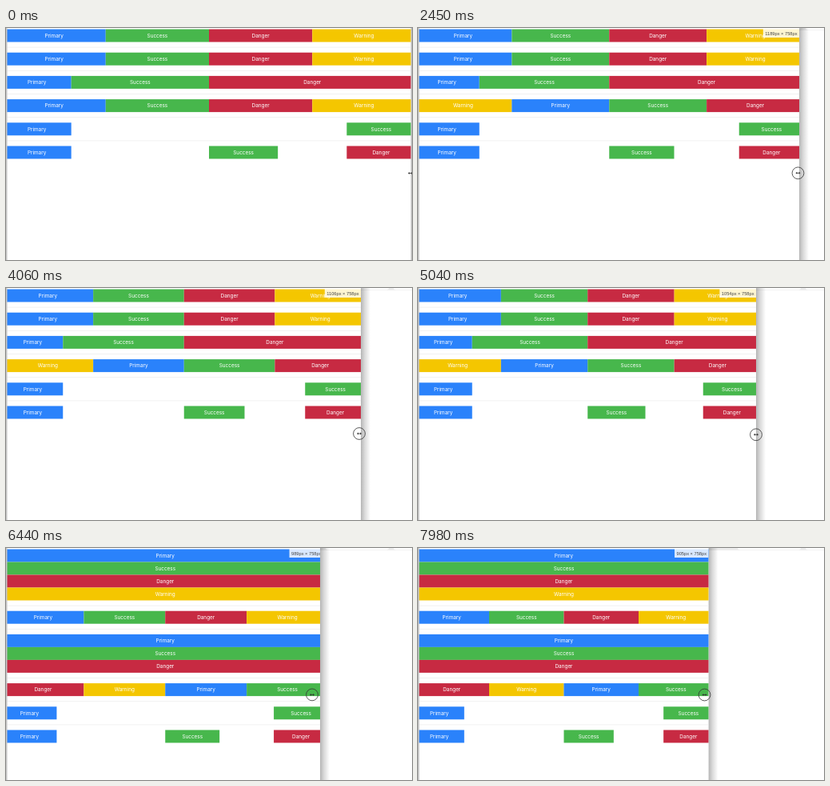
Write an HTML page with a canvas that moves like this. It is 508 by 290 pixels and loops after 8 s.

```html
<!DOCTYPE html>
<html lang="en">
<head>
<meta charset="utf-8">
<title>Responsive grid</title>
<style>
  html, body { margin: 0; width: 100%; height: 100%; overflow: hidden; background: #fff; }
  canvas { display: block; width: 508px; height: 290px; }
</style>
</head>
<body>
<canvas></canvas>
<script>
const STAGE_W = 508, STAGE_H = 290, LOOP = 8000, STEP = 70;
const SCALE = 0.4;              // stage pixels per page pixel
const LEFT = 1.5, TOP = 1.5, BAR = 16, GAP = 13.2, GUTTER = 6;

const canvas = document.querySelector('canvas');
const ctx = canvas.getContext('2d');
const dpr = window.devicePixelRatio || 1;
canvas.width = STAGE_W * dpr;
canvas.height = STAGE_H * dpr;
ctx.scale(dpr, dpr);

const COLORS = { Primary: '#2a82fb', Success: '#47b74c', Danger: '#c72a42', Warning: '#f4c600' };
const [P, S, D, W] = Object.keys(COLORS);

// [time, x] of the window's right edge and of the pointer dragging it
const edgeKeys = [[0, 506.5], [840, 506], [1540, 493.5], [1610, 493.5], [1750, 489.5],
  [2380, 477], [3430, 476.5], [3990, 444], [4060, 444], [4270, 438], [4970, 423], [5040, 423],
  [5110, 420], [5950, 401], [6370, 397], [6440, 393], [6790, 385], [7630, 368],
  [7910, 363.5], [8000, 363.5]];
const pointerKeys = [[0, 506], [840, 505], [1610, 492.5], [2450, 475.5], [3430, 475],
  [4060, 442], [5040, 423], [5950, 399], [6440, 383], [7980, 358.5], [8000, 358.5]];
const pointerYKeys = [[0, 181.5], [1610, 181], [4060, 182], [5040, 183.3], [8000, 183.5]];

function at(keys, t) {
  const i = Math.max(1, keys.findIndex(k => k[0] >= t));
  const [t0, a] = keys[i - 1], [t1, b] = keys[i];
  return a + (b - a) * (t - t0) / (t1 - t0);
}

function rect(x, y, w, h, color) {
  ctx.fillStyle = color;
  ctx.fillRect(x, y, w, h);
}

function bar(name, x, y, w) {
  rect(x, y, w, BAR, COLORS[name]);
  ctx.fillStyle = '#fff';
  ctx.font = '6.4px Inter, Roboto, sans-serif';
  ctx.textAlign = 'center';
  ctx.fillText(name, x + w / 2, y + BAR / 2 + 2.3);
}

// Each cell is [name, first column, column count] on a 12 column grid.
const quarters = names => names.map((name, i) => [name, i * 3, 3]);

function drawPage(edge) {
  const width = edge - LEFT, px = width / SCALE;
  const stacked = px < 992;
  const x0 = LEFT - GUTTER, col = (width + 2 * GUTTER) / 12;
  const order = px >= 1200 ? [P, S, D, W] : stacked ? [D, W, P, S] : [W, P, S, D];
  const rows = [
    { cells: quarters([P, S, D, W]), stacked },
    { cells: quarters([P, S, D, W]) },
    { cells: [[P, 0, 2], [S, 2, 4], [D, 6, 6]], stacked },
    { cells: quarters(order) },
    { cells: [[P, 0, 2], [S, 10, 2]] },
    { cells: [[P, 0, 2], [S, 6, 2], [D, 10, 2]] }
  ];
  let y = TOP;
  rows.forEach((row, r) => {
    if (r) {
      rect(LEFT, y + GAP / 2 - 0.4, width, 0.8, '#eee');
      y += GAP;
    }
    row.cells.forEach(([name, start, span], i) => {
      if (row.stacked) bar(name, x0, y + i * BAR, col * 12);
      else bar(name, x0 + start * col, y, span * col);
    });
    y += BAR * (row.stacked ? row.cells.length : 1);
  });
}

function drawSizeLabel(edge) {
  const text = `${Math.round((edge - LEFT) / SCALE)}px × 758px`;
  ctx.font = '5.7px "Liberation Sans", Arial, sans-serif';
  ctx.textAlign = 'left';
  const w = ctx.measureText(text).width + 5;
  rect(edge - w, 0.5, w, 11.5, 'rgba(255,255,255,.82)');
  ctx.fillStyle = '#444';
  ctx.fillText(text, edge - w + 2.5, 8.8);
}

function drawBackdrop(edge) {
  rect(0, 0, STAGE_W, STAGE_H, '#fff');
  rect(edge, 0, STAGE_W - edge, 3, '#ededed');
  ctx.fillStyle = '#fff';
  for (const [x, w] of [[400, 79], [485, 40]]) {
    ctx.beginPath();
    ctx.roundRect(x, -4, w, 6.2, 2.5);
    ctx.fill();
  }
  const shadow = ctx.createLinearGradient(edge, 0, edge + 12, 0);
  shadow.addColorStop(0, 'rgba(0,0,0,.29)');
  shadow.addColorStop(0.4, 'rgba(0,0,0,.15)');
  shadow.addColorStop(1, 'rgba(0,0,0,0)');
  rect(edge, 0, 12, STAGE_H, shadow);
}

function drawPointer(x, y, pressed) {
  ctx.strokeStyle = ctx.fillStyle = '#333';
  ctx.lineWidth = 0.8;
  if (pressed) {
    ctx.beginPath();
    ctx.arc(x, y, 7.4, 0, Math.PI * 2);
    ctx.stroke();
  }
  ctx.beginPath();
  ctx.moveTo(x - 2, y);
  ctx.lineTo(x + 2, y);
  ctx.stroke();
  for (const side of [-1, 1]) {
    ctx.beginPath();
    ctx.moveTo(x + side * 3, y);
    ctx.lineTo(x + side * 1.2, y - 1.5);
    ctx.lineTo(x + side * 1.2, y + 1.5);
    ctx.fill();
  }
}

function draw(now) {
  const t = Math.floor((now % LOOP) / STEP) * STEP;
  const edge = at(edgeKeys, t);
  const layoutEdge = at(edgeKeys, Math.max(0, t - STEP)); // content trails the window

  drawBackdrop(edge);
  ctx.save();
  ctx.beginPath();
  ctx.rect(0, 0, edge, STAGE_H);
  ctx.clip();
  rect(0, 0, edge, STAGE_H, '#fff');
  drawPage(layoutEdge);
  if (t > 840) drawSizeLabel(layoutEdge);
  rect(0, 0, LEFT, STAGE_H, '#c4c4c4');
  ctx.restore();
  drawPointer(at(pointerKeys, t), at(pointerYKeys, t), t >= 630);
}

function loop() {
  draw(performance.now());
  requestAnimationFrame(loop);
}
loop();
</script>
</body>
</html>
```
